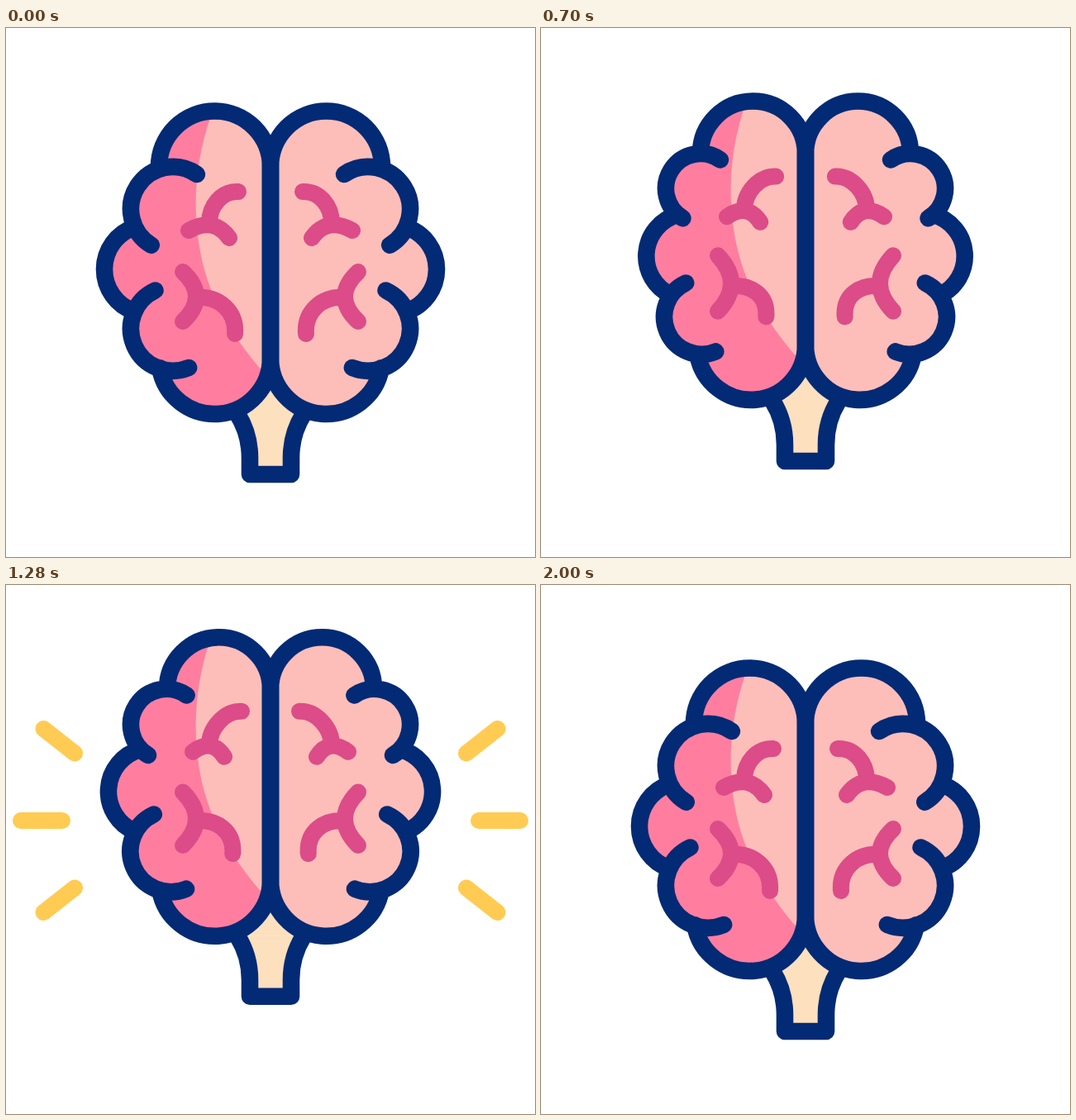
These frames come from a looping animation (640x640 px, 2.4 s). An HTML page:

```html
<!DOCTYPE html>
<html lang="en">
<head>
<meta charset="utf-8">
<title>Jumping brain</title>
<style>
  html, body { margin: 0; width: 100%; height: 100%; overflow: hidden; background: #fff; }
  svg { display: block; width: 100vw; height: 100vh; }
  path { stroke-linecap: round; stroke-linejoin: round; stroke-width: 20; }
  #ink, #stem { stroke: #032a75; stroke-width: 20.6; }
  #ink, #folds, #rays { fill: none; }
  #folds { stroke: #dc4c88; }
  #rays { stroke: #ffcb52; }
  #body { stroke: none; }
</style>
</head>
<body>
<svg viewBox="0 0 640 640">
  <defs>
    <clipPath id="shade">
      <path d="M263 60L248 106C230 157 225 212 234 265C243 320 270 372 320 426V490H90V60Z"/>
    </clipPath>
    <path id="body"/>
    <g id="lines"><path id="folds"/><path id="ink"/></g>
    <path id="rays"/>
  </defs>
  <use href="#rays"/>
  <use href="#rays" transform="matrix(-1 0 0 1 640 0)"/>
  <g id="brain">
    <path fill="#fde0bd" d="M320 428L280 467H360Z"/>
    <path id="stem" fill="#fde0bd" d="M280 467C290 483 295 502 295 520V540H345V520C345 502 350 483 360 467"/>
    <use href="#body" fill="#fdbeb9"/>
    <g clip-path="url(#shade)"><use href="#body" fill="#ff7ea0"/></g>
    <use href="#body" fill="#fdbeb9" transform="matrix(-1 0 0 1 640 0)"/>
    <use href="#lines"/>
    <use href="#lines" transform="matrix(-1 0 0 1 640 0)"/>
  </g>
</svg>
<script>
const LOOP = 2400, PULSE = 680;
const LOW = 25, HIGH = -42.3;
const TOP = 168, BOTTOM = 399.5;
const RAD = Math.PI / 180;
const $ = id => document.getElementById(id);
const setPath = (id, d) => $(id).setAttribute('d', d);
const mix = (a, b, k) => a + (b - a) * k;
const mixAll = (a, b, k) => a.map((v, i) => mix(v, b[i], k));
const ramp = (t, from, to) => Math.min(1, Math.max(0, (t - from) / (to - from)));
const smooth = u => (1 - Math.cos(Math.PI * u)) / 2;

// Crouch, float up, drop, settle.
function height(t) {
  if (t < 390) return LOW * smooth(ramp(t, 220, 390));
  if (t < 1350) return mix(HIGH, LOW, (1 - ramp(t, 390, 1350)) ** 2.4);
  if (t < 1700) return mix(HIGH, LOW, ramp(t, 1350, 1700) ** 2.4);
  return LOW * (1 - smooth(ramp(t, 1700, 2000)));
}

// Two squeezes in a row, each lobe a little later than the one above.
function squeeze(t, index) {
  const start = 260 + 80 * index;
  return Math.sin(2 * Math.PI * ramp(t, start, start + 2 * PULSE)) ** 2;
}

const pointOn = ([x, y, r], deg) =>
  `${x + r * Math.cos(deg * RAD)} ${y + r * Math.sin(deg * RAD)}`;

const arc = (c, from, to) =>
  `M${pointOn(c, from)}A${c[2]} ${c[2]} 0 ${to - from > 180 ? 1 : 0} 1 ${pointOn(c, to)}`;

const disc = c => arc(c, 0, 180) + `A${c[2]} ${c[2]} 0 0 1 ${pointOn(c, 0)}Z`;

// Angle on circle a where it meets circle b.
function meet(a, b, side) {
  const dx = b[0] - a[0], dy = b[1] - a[1], d = Math.hypot(dx, dy);
  const spread = Math.acos((d * d + a[2] ** 2 - b[2] ** 2) / (2 * d * a[2]));
  return (Math.atan2(dy, dx) + side * spread) / RAD;
}

function drawLobes(top, upper, middle, lower, bottom) {
  const r1 = mix(67.5, 62.5, top);
  const r2 = mix(67.5, 61.5, bottom), h2 = mix(67.5, 63.5, bottom);
  const up = mixAll([202, 219, 51], [193, 210, 42], upper);
  const mid = mixAll([173, 292, 54], [180, 292, 52], middle);
  const low = mixAll([202, 363.7, 51], [190, 366.5, 42], lower);
  const endX = 320 - r2 - r2 * Math.cos(10 * RAD);
  const endY = BOTTOM + h2 * Math.sin(10 * RAD);

  setPath('body',
    `M${320 - 2 * r1} ${TOP}A${r1} ${r1} 0 0 1 320 ${TOP}V${BOTTOM}` +
    `A${r2} ${h2} 0 0 1 ${320 - 2 * r2} ${BOTTOM}Z` + [up, mid, low].map(disc).join(''));
  setPath('ink',
    `M320 ${TOP}A${r1} ${r1} 0 0 0 ${320 - 2 * r1} ${TOP}` +
    `M320 ${TOP}V${BOTTOM}A${r2} ${h2} 0 0 1 ${endX} ${endY}` +
    arc(up, 121, 304.5) + arc(low, 68, 245) +
    arc(mid, meet(mid, low, 1), meet(mid, up, -1) + 360));
}

function drawFolds(top, middle) {
  const [ax, ay, bx, by, cx, cy] =
    mixAll([281, 198, 221, 245, 270, 254], [285, 195, 226, 244, 264, 250], top);
  const [spread, fx, fy, joint] = mixAll([30, 277, 370, 326], [34, 272, 365, 328.5], middle);
  setPath('folds',
    `M${ax} ${ay}C${ax - 20} ${ay - 1} 246 215 246 236` +
    `M${bx} ${by}Q${mix(bx, cx, 0.63)} ${by - 17} ${cx} ${cy}` +
    `M214 ${325 - spread}Q246 325 214 ${325 + spread}` +
    `M230 ${joint}C${fx - 19} ${joint - 2} ${fx + 2} ${fy - 27} ${fx} ${fy}`);
}

function drawRays(t) {
  const tip = 1 - (1 - ramp(t, 735, 980)) ** 2;
  const tail = ramp(t, 1300, 1460) ** 2;
  const ray = (x1, y1, x2, y2) =>
    `M${mix(x1, x2, tail)} ${mix(y1, y2, tail)}L${mix(x1, x2, tip)} ${mix(y1, y2, tip)}`;
  setPath('rays', tip > 0 && tail < 1
    ? ray(83, 203.5, 45.5, 174) + ray(68, 285, 18, 285) + ray(83, 366.5, 45.5, 396)
    : '');
}

function draw(t) {
  const lobes = [0, 1, 2, 3, 4].map(i => squeeze(t, i));
  $('brain').setAttribute('transform', `translate(0 ${height(t)})`);
  drawLobes(...lobes);
  drawFolds(lobes[0], lobes[2]);
  drawRays(t);
}

const start = performance.now();
function tick() {
  draw((performance.now() - start) % LOOP);
  requestAnimationFrame(tick);
}
tick();
</script>
</body>
</html>
```
